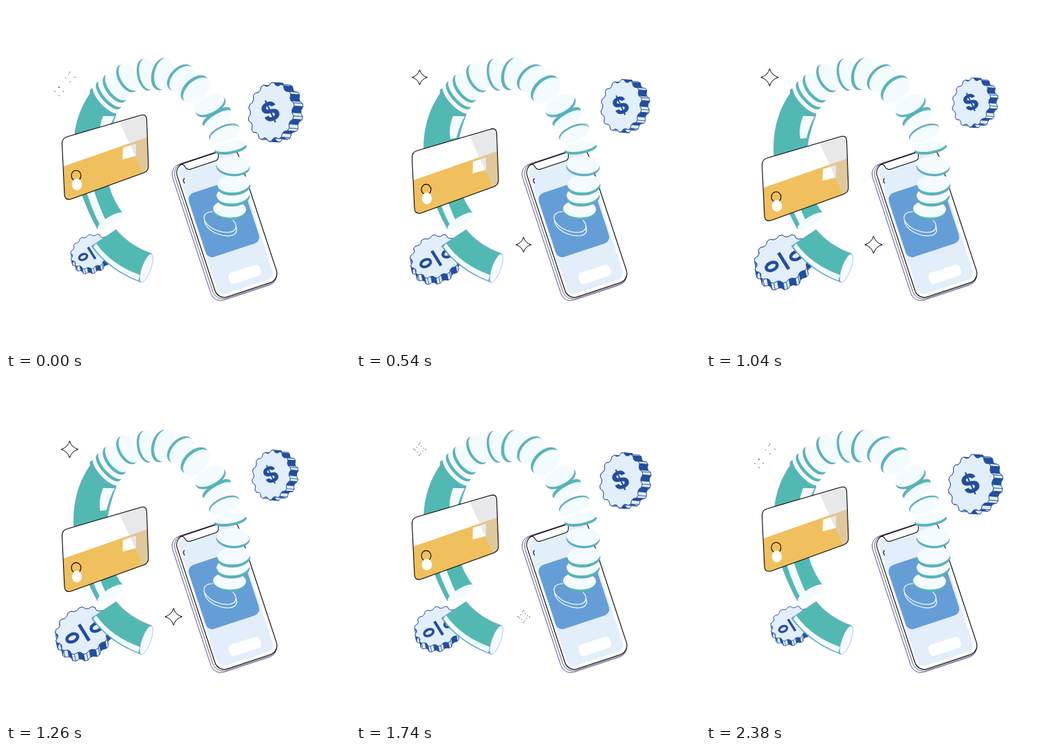
Recreate the animation shown at these times as an HTML page with a canvas. Size 500 px wide and 500 px high, loop 2.4 s.

```html
<!DOCTYPE html>
<html>
<head>
<meta charset="utf-8">
<style>
  html, body { margin: 0; width: 100%; height: 100%; overflow: hidden; background: #fff; }
  canvas { display: block; width: 500px; height: 500px; }
</style>
</head>
<body>
<canvas id="stage" width="500" height="500"></canvas>
<script>
const ctx = document.getElementById('stage').getContext('2d');
const LOOP = 2400, TAU = Math.PI * 2, RAD = Math.PI / 180;
const TEAL = '#52b9b2', LIGHT = '#f3fbfe', ICE = '#e2eef9', NAVY = '#224d9f',
      BLUE = '#659ed6', GOLD = '#f0c05e', EDGE = '#7b86e0';

const mix = (a, b, p) => a + (b - a) * p;

// cubic-bezier(0, 0, .58, 1)
function easeOut(x) {
  let lo = 0, hi = 1;
  for (let i = 0; i < 24; i++) {
    const s = (lo + hi) / 2;
    if (1.74 * s * s * (1 - s) + s ** 3 < x) lo = s; else hi = s;
  }
  return lo * lo * (3 - 2 * lo);
}

function paint(path, fill, stroke, width = 1) {
  if (fill) { ctx.fillStyle = fill; ctx.fill(path); }
  if (stroke) { ctx.strokeStyle = stroke; ctx.lineWidth = width; ctx.stroke(path); }
}
const shape = (d, fill, stroke, width) => paint(new Path2D(d), fill, stroke, width);

function oval(x, y, rx, ry, deg, fill, stroke, width) {
  const path = new Path2D();
  path.ellipse(x, y, rx, ry, deg * RAD, 0, TAU);
  paint(path, fill, stroke, width);
}

function box(x, y, w, h, r, fill, stroke, width) {
  const path = new Path2D();
  path.roundRect(x, y, w, h, r);
  paint(path, fill, stroke, width);
}

function placed(x, y, scale, deg, draw) {
  ctx.save();
  ctx.translate(x, y);
  ctx.rotate(deg * RAD);
  ctx.scale(scale, scale);
  draw();
  ctx.restore();
}

function poly(points, fill, stroke, width) {
  const path = new Path2D();
  points.forEach(([x, y]) => path.lineTo(x, y));
  path.closePath();
  paint(path, fill, stroke, width);
}

// Toothed disc, extruded by (dx, dy)
function gear(x, y, rx, ry, deg, teeth, dx, dy) {
  const c = Math.cos(deg * RAD), s = Math.sin(deg * RAD), count = teeth * 4;
  const rim = Array.from({ length: count }, (_, i) => {
    const a = i / count * TAU, r = i % 4 < 2 ? 1 : 0.91;
    const u = Math.cos(a) * rx * r, v = Math.sin(a) * ry * r;
    return [x + u * c - v * s, y + u * s + v * c];
  });
  const back = rim.map(([px, py]) => [px + dx, py + dy]);
  poly(back, ICE, NAVY, 1);
  rim.forEach((point, i) => {
    const j = (i + 1) % count;
    poly([point, rim[j], back[j], back[i]], i % 4 === 1 || i % 4 === 2 ? NAVY : ICE, NAVY, 0.8);
  });
  poly(rim, ICE, NAVY, 1);
}

function dollarCoin(p) {
  placed(mix(392, 391.2, p), mix(154, 139.8, p), mix(1, 0.83, p), 0, () => {
    gear(-6.5, 0, 33, 43, 10, 14, 13, 1);
    ctx.translate(-8, -1);
    ctx.rotate(-25 * RAD);
    ctx.fillStyle = NAVY;
    ctx.font = '800 38px Inter, sans-serif';
    ctx.textAlign = 'center';
    ctx.textBaseline = 'alphabetic';
    ctx.fillText('$', 0, 14);
  });
}

function percentCoin(p) {
  placed(mix(123.5, 111, p), mix(357, 368, p), mix(0.71, 1, p), 0, () => {
    gear(0, 0, 43, 34, -25, 14, 2, 10);
    oval(-16, 11, 8.5, 5.5, -25, null, NAVY, 4.5);
    oval(20, -5, 8.5, 5.5, -25, null, NAVY, 4.5);
    shape('M-6-9L9 15', null, NAVY, 5);
  });
}

function sparkle(x, y, r, gap) {
  const k = r * 0.22;
  ctx.save();
  ctx.translate(x, y);
  if (gap > 0) ctx.setLineDash([1.2, gap]);
  shape(`M0 ${-r}Q${k} ${-k} ${r} 0Q${k} ${k} 0 ${r}Q${-k} ${k} ${-r} 0Q${-k} ${-k} 0 ${-r}Z`, null, '#000', 1);
  ctx.restore();
}

function tube() {
  shape('M127 121C92 165 84 235 133 324L170 302C140 262 138 215 160 158Z', TEAL, EDGE, 0.6);
  shape('M141 160Q134 178 137 193L146 192Q150 175 158 160Z', LIGHT);
  shape('M113 255H124Q132 285 147 316L138 321Q122 292 113 255Z', LIGHT);
  oval(152, 312.5, 21.5, 6.5, -31, LIGHT);

  shape('M124 349L160 325Q180 349 212 360L197 402Q150 385 124 349Z', TEAL, EDGE, 0.6);
  shape('M131 345Q153 376 195 391L192 399Q149 381 127 350Z', LIGHT);
  oval(204, 381, 22, 6.5, -70, LIGHT, EDGE, 0.5);
}

function phone() {
  placed(320.9, 315.5, 1, -18.25, () => {
    box(-54, -103, 100, 208, 15, '#fff', '#5a50a8', 0.9);
    box(-50.5, -102.5, 97, 206, 15, '#fff', '#333', 0.7);
    box(-47, -102, 94, 204, 14, '#fff', '#000', 1.1);
    box(-43.5, -98, 85, 195, 10, ICE);
    shape('M-36-102Q-33-101-32-97Q-31-91-25-91H12Q18-91 19-97Q20-101 24-102Z', '#fff', '#000', 1);
    shape('M-38-81Q-42-79-40-74', null, '#000', 1.1);
    box(-42.5, -57, 81.5, 98, 10, BLUE);
    box(-22.5, 70.5, 48, 17, 6, '#fff');
  });
  oval(312, 319, 24.5, 13, 22, null, '#fff', 1.2);
  oval(311, 314, 24.5, 13, 22, BLUE, '#fff', 1.2);
}

// x, y, long radius, short radius, tilt, rim offset
const COINS = [
  [145, 136, 26, 9, 47, -4, 4], [152, 127, 25, 10, 49, -3, 3],
  [161, 117, 23.5, 12, 53, -3, 3], [179, 103, 22, 12.5, 60, -3, 2],
  [206, 99, 23, 12, 78, -3, 1], [230, 98, 23.5, 14, 104, -4, 1],
  [256, 106, 22.5, 14, 134, -3, -2], [277, 123, 23.5, 14, 137, -3, -3],
  [325, 295, 24, 12.5, 2, 0, 3.5], [330, 274, 24, 13, -5, 0, 4],
  [331, 258, 24, 13, -5, 0, 4], [330, 231, 24, 13, 3, 0, 3],
  [326, 204, 23.5, 7, -10, 0.5, 3.5], [318, 186, 23, 10, -23, -1, -2],
  [308, 165, 23, 8, -31, -2, -4], [296, 143, 23.5, 12, -28, 1.5, 3]
];

function coins() {
  for (const [x, y, rx, ry, deg, dx, dy] of COINS) {
    oval(x + dx, y + dy, rx, ry, deg, TEAL, EDGE, 0.7);
    oval(x, y, rx, ry, deg, LIGHT);
  }
}

function card(p) {
  const outline = new Path2D('M81.5 201Q81 192 89 190L195 159Q204 156 204.5 165L207 233Q207 240 200 242.5L95 280.5Q85.5 283 85 274Z');
  ctx.save();
  ctx.translate(0, 32 * p);
  paint(outline, '#fff');
  ctx.save();
  ctx.clip(outline);
  shape('M78 235L210 189V290H78Z', GOLD);
  shape('M170 206L189 200V218L169.5 223Z', '#fff');
  shape('M165 168L210 152V248L199 243Z', 'rgba(209,209,214,.5)');
  ctx.restore();
  paint(outline, null, '#000', 1.1);
  oval(102, 246.5, 7, 7.5, 0, null, '#000', 1.1);
  oval(103, 259.5, 7.3, 8.5, 0, '#fff');
  ctx.restore();
}

function frame(now) {
  const phase = now % LOOP / (LOOP / 2);
  const p = phase < 1 ? easeOut(phase) : 1 - easeOut(phase - 1);
  ctx.fillStyle = '#fff';
  ctx.fillRect(0, 0, 500, 500);

  const gap = Math.max(0, 0.6 - p) * 16;
  sparkle(92.5, 103.7, mix(8, 12.8, p), gap);
  if (p > 0.05) sparkle(243.5, 347, mix(8, 12.8, p), gap);
  if (p < 0.25) sparkle(77, 124, 6.5, 8);

  percentCoin(p);
  dollarCoin(p);
  tube();
  phone();
  coins();
  card(p);
  requestAnimationFrame(frame);
}
requestAnimationFrame(frame);
</script>
</body>
</html>
```
